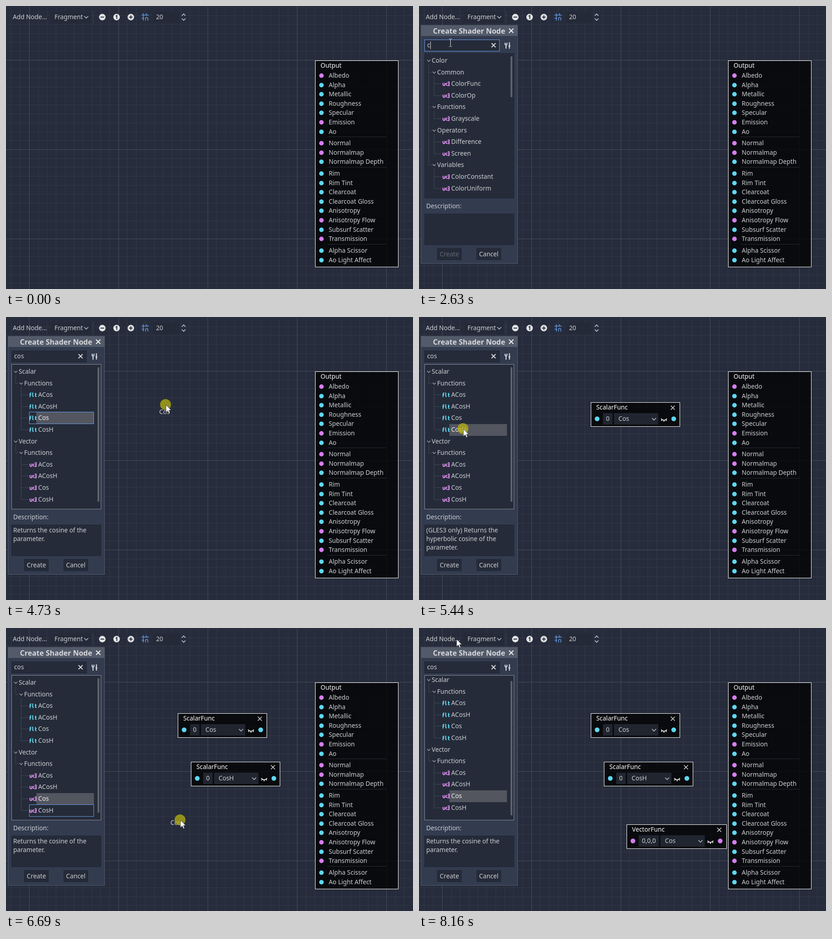
An HTML page with a canvas for the animation above (8.24 s loop, 898 px wide and 624 px high).

```html
<!DOCTYPE html>
<html lang="en">
<head>
<meta charset="utf-8">
<title>Shader node dialog</title>
<style>
html, body { margin: 0; width: 100%; height: 100%; overflow: hidden; background: #262c3b; }
canvas { display: block; }
</style>
</head>
<body>
<canvas id="stage" width="898" height="624"></canvas>
<script>
const g = document.getElementById('stage').getContext('2d');
const LOOP = 8240;
const BG = '#262c3b', TEXT = '#cdcfd2', BLUE = '#699ce8', CYAN = '#5fd7f0', PINK = '#d67df0';

// Bursts of movement: start, end, number of steps.
const BURSTS = [[70, 770, 10], [1090, 1320, 4], [4110, 4900, 11], [4960, 5200, 4],
  [5350, 5670, 5], [5840, 6310, 7], [6540, 6850, 5], [7000, 7380, 6], [7550, 8160, 9]];

// Pointer path: time, x, y.
const PATH = [[70, 714, 563], [537, 50, 23], [1010, 50, 23], [1320, 69, 81], [4031, 69, 81],
  [4268, 85, 222], [4426, 88, 222], [4505, 112, 221], [4584, 200, 215], [4663, 294, 206],
  [4742, 353, 194], [4821, 374, 189], [4900, 379, 188], [5200, 97, 257], [5350, 98, 250],
  [5430, 98, 247], [5510, 200, 255], [5590, 365, 286], [5670, 408, 295], [5762, 408, 295],
  [6310, 88, 362], [6540, 88, 364], [6617, 298, 396], [6695, 385, 424], [6772, 438, 431],
  [6850, 458, 433], [6924, 458, 433], [7380, 233, 407], [7474, 233, 407], [8160, 83, 25]];

// First letter of an entry: 0/1 open group, c closed group, f/v/b leaf type.
const TREES = {
  closed: 'cColor cBoolean cInput cScalar cTextures cTransform cVector cSpecial',
  c: '0Color 1Common vColorFunc vColorOp 1Functions vGrayscale 1Operators vDifference vScreen 1Variables vColorConstant vColorUniform',
  co: '0Color 1Common vColorFunc vColorOp 1Variables vColorConstant vColorUniform 0Boolean 1Functions bCompare 1Variables bBooleanConstant',
  cos: '0Scalar 1Functions fACos fACosH fCos fCosH 0Vector 1Functions vACos vACosH vCos vCosH'
};
const ICONS = {
  f: [CYAN, 'M53 5V-2Q53-4 56-4M53 0H56M59-5V2Q59 4 61 4M65-4V2Q65 4 67.5 4M65-1H67.5'],
  v: ['#e08df0', 'M53-2V1Q53 4 55 4Q57 4 57 1V-2M62.5-1Q59.5-2 59.5 1Q59.5 4 62.5 3M63.5-4H66.5V4H63M64 0H66.5'],
  b: ['#8da6f0', 'M53-5V3H56V-1H53M59-1H63V3H59ZM66-5V2Q66 4 68 4']
};

function rect(x, y, w, h, fill, line) {
  if (fill) { g.fillStyle = fill; g.fillRect(x, y, w, h); }
  if (line) { g.strokeStyle = line; g.lineWidth = 1; g.strokeRect(x + .5, y + .5, w - 1, h - 1); }
}
function text(s, x, y, color = TEXT, align = 'left', font = '13.75px') {
  g.font = font + ' "Noto Sans", sans-serif';
  g.textAlign = align;
  g.fillStyle = color;
  g.fillText(s, x, y + 5);
}
function draw(d, x, y, color, width = 1.5, fill) {
  const p = new Path2D(d);
  g.save();
  g.translate(x, y);
  if (fill) { g.fillStyle = fill; g.fill(p); }
  if (color) { g.strokeStyle = color; g.lineWidth = width; g.stroke(p); }
  g.restore();
}
function dot(x, y, r, color) {
  g.fillStyle = color;
  g.beginPath();
  g.arc(x, y, r, 0, 7);
  g.fill();
}
const cross = (x, y, r, color, w) => draw(`M${-r} ${-r}L${r} ${r}M${r} ${-r}L${-r} ${r}`, x, y, color, w);
const chevron = (x, y, r = 4.5, color = '#b4b8bf') => draw(`M${-r} ${-r / 2}L0 ${r / 2}L${r} ${-r / 2}`, x, y, color, 1.7);

function grid() {
  rect(0, 0, 898, 624, BG);
  const lines = (first, step, color) => {
    for (let i = 0; i < 48; i++) {
      rect(Math.floor(first[0] + i * step), 0, 1, 624, color);
      rect(0, Math.floor(first[1] + i * step), 898, 1, color);
    }
  };
  lines([11.9, 1.3], 19.7, '#323846');
  lines([51.3, 119.3], 197, '#474d59');
  rect(0, 0, 898, 1, '#1e232f');
}

function toolbar() {
  text('Add Node...', 15, 24);
  rect(98, 12, 89, 26, '#242a38');
  text('Fragment', 107, 24);
  chevron(177, 24.5);
  rect(192, 11, 1, 28, '#3d4351');
  for (const x of [212.5, 244, 275.5]) dot(x, 24.5, 7.2, '#e3e4e6');
  draw('M-4 0H4M59 0H67M63-4V4', 212.5, 24.5, BG, 2);
  draw('M-2-2L0.5-3.5V4', 244, 24.5, BG, 2);
  draw('M4 0V16M0 4H16M0 11H6M11 0V5M9 16V12Q9 9 11.5 9Q14 9 14 12V16', 299, 16, '#6093dc', 1.6);
  rect(324, 12, 59, 26, '#242a38');
  text('20', 331, 24);
  draw('M-4-3L0-7L4-3M-4 3L0 7L4 3', 392, 24.5, '#c5c8cd', 1.7);
}

function panel(x, y, w, h) {
  rect(x, y, w, h, 'rgba(0,0,0,.77)', '#fff');
}
function output() {
  panel(682, 120, 184, 456);
  text('Output', 694, 131, '#fff');
  const groups = ['Albedo Alpha Metallic Roughness Specular Emission Ao', 'Normal Normalmap Normalmap_Depth',
    'Rim Rim_Tint Clearcoat Clearcoat_Gloss Anisotropy Anisotropy_Flow Subsurf_Scatter Transmission',
    'Alpha_Scissor Ao_Light_Affect'];
  const vectors = /^(Albedo|Emission|Normal|Normalmap|Anisotropy_Flow|Transmission)$/;
  [153, 302, 369, 539].forEach((top, i) => {
    if (i) rect(709, top - 14, 130, 1, '#282b31');
    groups[i].split(' ').forEach((s, k) => {
      const y = Math.round(top + k * 20.6);
      dot(696, y + .5, 5, vectors.test(s) ? PINK : CYAN);
      text(s.replaceAll('_', ' '), 712, y);
    });
  });
}
function funcNode(x, y, name, value, fn, color, extra = 0) {
  const field = '#20252f', r = x + extra;
  panel(x, y, 197 + Math.ceil(extra), 54);
  text(name, x + 12, y + 11, '#fff');
  cross(r + 181, y + 12, 4.5, '#d5d6d8', 1.5);
  dot(x + 14, y + 36.5, 5.2, color);
  rect(x + 27, y + 24, 21 + extra, 25, field);
  text(value, x + 37.5 + extra / 2, y + 36, TEXT, 'center');
  rect(r + 51, y + 24, 98, 25, field);
  text(fn, r + 61, y + 36);
  chevron(r + 139.5, y + 37);
  draw('M-6.5-1Q0 6.5 6.5-1M0 3V6M-4.5 2L-6 4M4.5 2L6 4', r + 161.5, y + 37, '#eee', 1.8);
  dot(r + 183, y + 36.5, 5.2, color);
}

function tree(query, scroll, selected, focus) {
  g.save();
  g.beginPath();
  g.rect(13, 105, 196, 318);
  g.clip();
  const parents = [];
  TREES[query].split(' ').forEach((entry, i) => {
    const kind = entry[0], name = entry.slice(1), y = Math.round(120 + i * 25.6) - scroll;
    const depth = kind === '1' ? 1 : ICONS[kind] ? 2 : 0;
    if (depth) {
      const x = 9.5 + depth * 12, from = parents[depth - 1] + 8;
      draw(`M${x} ${from}V${y + .5}H${depth > 1 ? 50 : 28}`, 0, 0, '#414755', 1);
    }
    parents[depth] = y;
    if (i === selected) rect(67, y - 12, 127, 26, '#53565f');
    if (i === focus) rect(51, y - 13, 143, 27, null, BLUE);
    if (kind === 'c') draw('M-1.8-3.5L1.8 0L-1.8 3.5', 21, y, '#8f949d', 1.6);
    else if (depth < 2) chevron(21.5 + depth * 12, y + .5, 3.5, '#8f949d');
    else draw(ICONS[kind][1], 0, y + .5, ICONS[kind][0], 2);
    text(name, [28, 40, 71][depth], y, i === selected ? '#f0f1f2' : TEXT);
  });
  const bar = { c: 90, co: 165, cos: 296 }[query];
  if (bar) rect(202, 111 + scroll, 4, bar, '#5c626e');
  g.restore();
}

function dialog(t, q) {
  const query = t < 2630 ? '' : t < 2780 ? 'c' : t < 3330 ? 'co' : 'cos';
  const picked = q > 4340, typing = t >= 1550 && !picked;
  const box = (x, y, w, h, line = '#1f2430') => rect(x, y, w, h, '#252b39', line);

  rect(4, 42, 214, 526, '#333b4f', '#535b6c');
  rect(4, 42, 214, 24, '#535a69');
  text('Create Shader Node', 110.5, 55.5, '#d5d7db', 'center', 'bold 16px');
  cross(203.5, 54.5, 4.8, '#f0f0f0', 2);

  box(12, 74, 166, 26, typing ? BLUE : undefined);
  text(query || 'Search', 18, 86, query ? TEXT : '#858a94');
  if (query) cross(164.5, 86.5, 4.5, '#d5d7db', 2);
  else draw('M2.2 0A4 4 0 1 1-5.8 0A4 4 0 1 1 2.2 0M1 3L6 8', 164.5, 84.5, '#e3e4e6', 2);
  if (typing && (t < 2320 || t >= 2630 && t < 3940)) {
    rect(query ? 18 + Math.round(g.measureText(query).width) : 18, 78, 1, 17, '#e3e4e6');
  }
  draw('M-5.5-6V-3Q-5.5-1-3.5-1Q-1.5-1-1.5-3V-6M-3.5-1V7M4-7V0M2 1H6M4 1V7', 195.5, 87, '#e3e4e6', 2);

  box(12, 104, 198, 320, picked ? '#888d97' : undefined);
  const selected = q >= 6540 ? 10 : q >= 5350 ? 5 : picked ? 4 : -1;
  const focus = picked && q < 4960 ? 4 : q > 5500 && q < 5840 ? 5 : q > 6610 && q < 7000 ? 11 : -1;
  tree(query || 'closed', q >= 6850 ? 6 : 0, selected, focus);

  text('Description:', 16, 440.5);
  box(12, 458, 198, 69);
  const about = selected === 5
    ? ['(GLES3 only) Returns the', 'hyperbolic cosine of the', 'parameter.']
    : picked ? ['Returns the cosine of the', 'parameter.'] : [];
  about.forEach((s, i) => text(s, 16, 470 + i * 19));

  box(40, 534, 54, 26, t < 1550 ? BLUE : undefined);
  text('Create', 67, 547, picked ? TEXT : '#646a76', 'center');
  box(127, 534, 54, 26);
  text('Cancel', 154, 547, TEXT, 'center');
}

// Moves advance in short steps; between bursts the last pose holds.
function stepped(t) {
  const [start, end, n] = BURSTS.findLast(b => t >= b[0]) || [0, 0, 2];
  const step = (end - start) / (n - 1);
  return step ? Math.min(end, start + Math.floor((t - start + 16) / step) * step) : 0;
}
function pointer(t) {
  const i = PATH.findIndex(k => k[0] > t);
  if (i < 1) return PATH[i ? PATH.length - 1 : 0].slice(1);
  const [a, b] = [PATH[i - 1], PATH[i]];
  let u = (t - a[0]) / (b[0] - a[0]);
  if (b[0] - a[0] > 200) u = u * u * (3 - 2 * u);
  return [a[1] + (b[1] - a[1]) * u, a[2] + (b[2] - a[2]) * u];
}
function cursor(t, q) {
  const [x, y] = pointer(q);
  const within = (v, a, b) => v >= a && v < b;
  const drag = within(q, 4500, 4960) || within(q, 6610, 7000) ? 'Cos' : within(q, 5500, 5840) ? 'CosH' : '';
  if (drag) {
    const [lx, ly] = pointer(q - 20);
    text(drag, lx, ly + 12);
  }
  if (drag || within(q, 530, 690) || within(t, 1550, 1690) || within(q, 4340, 4500) ||
      within(q, 5350, 5500) || within(q, 6540, 6610)) {
    dot(x - 1, y - 1, 12, 'rgba(183,178,16,.75)');
  }
  if (q > 690 && within(x, 12, 178) && within(y, 74, 100)) {
    draw('M-3-8.5H-1L0-7.5L1-8.5H3M0-7.5V7.5M-3 8.5H-1L0 7.5L1 8.5H3', x + .5, y, '#e8e8e8', 1);
  } else {
    draw('M0 0V16L4 12.5L6.5 18.5L9 17.5L6.5 11.5H11.5Z', x, y, '#22252c', .7, '#fff');
  }
}

function frame() {
  const t = performance.now() % LOOP, q = stepped(t);
  grid();
  output();
  if (q >= 4960) funcNode(379, 188, 'ScalarFunc', '0', 'Cos', CYAN);
  if (q >= 5840) funcNode(408, 295, 'ScalarFunc', '0', 'CosH', CYAN);
  if (q >= 7000) funcNode(458, 433, 'VectorFunc', '0,0,0', 'Cos', PINK, 23.5);
  toolbar();
  if (q > 690) dialog(t, q);
  if (t >= 70) cursor(t, q);
  requestAnimationFrame(frame);
}
frame();
</script>
</body>
</html>
```
